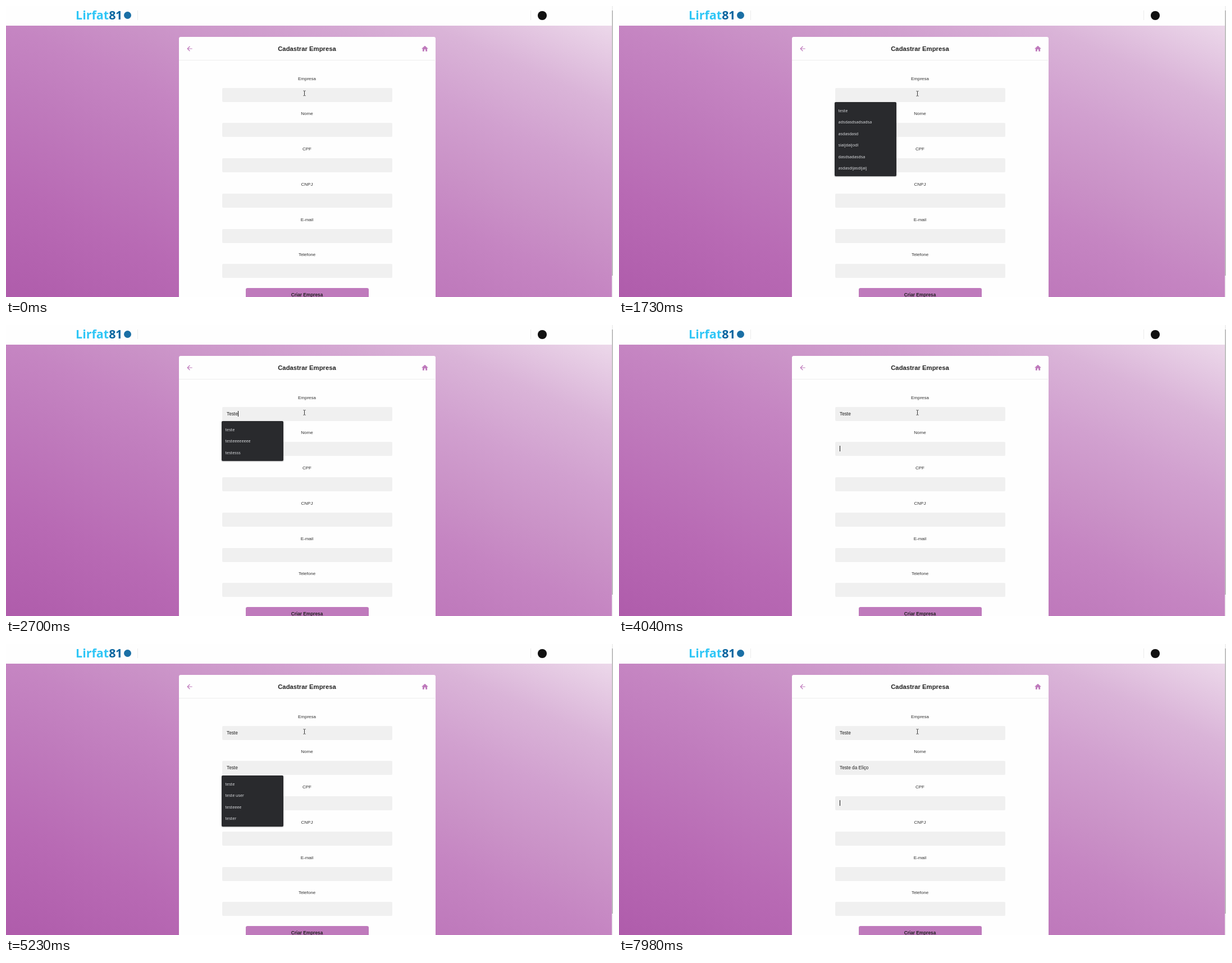
Write an HTML page that moves like this. It is 1081 by 518 pixels and loops after 8000 ms.

```html
<!DOCTYPE html>
<html lang="pt-BR">
<head>
<meta charset="utf-8">
<title>Cadastrar Empresa</title>
<style>
  html, body { margin: 0; width: 100%; height: 100%; overflow: hidden; }
  #stage {
    position: relative; width: 1081px; height: 518px; overflow: hidden;
    font-family: "Liberation Sans", Arial, sans-serif; color: #222;
  }
  #stage div, #stage svg { position: absolute; box-sizing: border-box; }
  .page {
    left: 0; top: 35px; width: 1079px; height: 483px;
    background: linear-gradient(to top right, #af5cab, #b86ab4 20%, #c07cbd 40%,
      #c585c2 50%, #ca92c7 60%, #d1a0cf 72%, #dab4d8 85%, #ecd8ea);
  }
  .top { left: 0; top: 0; width: 1079px; height: 35px; background: #fefefe; }
  .brand {
    left: 124px; top: 1px; line-height: 30px; color: #2fc6f6; white-space: nowrap;
    font-family: "Open Sans", "Noto Sans", sans-serif; font-size: 21.5px; font-weight: 700;
  }
  .brand b { color: #0b66a0; letter-spacing: -.5px; }
  .dot { border-radius: 50%; }
  .rule { top: 8px; width: 1px; height: 17px; background: #ececec; }
  .track { left: 1079px; top: 0; width: 2px; height: 518px; background: #f1f1f1; }
  .thumb { left: 0; top: 8px; width: 2px; height: 472px; background: #c1c1c1; }
  .card {
    left: 308px; top: 55px; width: 456.5px; height: 470px;
    background: #fefefe; border-radius: 3px;
  }
  .title {
    left: 0; top: 0; width: 456px; height: 42px; line-height: 42.5px;
    border-bottom: 1px solid #eee; text-align: center;
    font-size: 11.3px; font-weight: bold;
  }
  #form { left: 0; top: 0; }
  .label {
    left: 384px; width: 304px; height: 12px; line-height: 12px;
    text-align: center; font-size: 8px; color: #333;
  }
  .field {
    left: 384.5px; width: 303.5px; height: 25px; padding-left: 8.5px; line-height: 25.6px;
    background: #f0f0f0; border-radius: 2px; font-size: 8.27px; white-space: pre;
  }
  .caret {
    display: inline-block; width: 1px; height: 10px; margin-right: -1px;
    vertical-align: -2px; background: #111;
  }
  .button {
    left: 426.5px; top: 501.5px; width: 219px; height: 26px; line-height: 25.5px;
    background: #bf7abc; border-radius: 3px; text-align: center;
    font-size: 8.27px; font-weight: bold;
  }
  .list {
    left: 384px; width: 109.5px; padding: 4.7px 0 4.5px 6.5px; white-space: pre;
    background: #292a2d; color: #e4e6e9; border-radius: 2px;
    box-shadow: 0 1px 2px rgba(0, 0, 0, .3);
    font: 7.25px/20.5px "Open Sans", "Noto Sans", sans-serif;
  }
</style>
</head>
<body>
<div id="stage">
  <div class="page"></div>
  <div class="top">
    <div class="brand">Lirfat<b>81</b></div>
    <div class="dot" style="left:210px;top:10px;width:13px;height:13px;background:#1a6fa5"></div>
    <div class="rule" style="left:234px"></div>
    <div class="rule" style="left:934px"></div>
    <div class="dot" style="left:947px;top:9px;width:15.5px;height:15.5px;background:#111"></div>
  </div>
  <div class="track"><div class="thumb"></div></div>
  <div class="card"><div class="title">Cadastrar Empresa</div></div>
  <svg style="left:319.5px;top:68.8px" width="14" height="14" viewBox="0 0 24 24" fill="#bf7abc">
    <path d="M20 11H7.83l5.59-5.59L12 4l-8 8 8 8 1.41-1.41L7.83 13H20z"/>
  </svg>
  <svg style="left:738.8px;top:68.8px" width="14" height="14" viewBox="0 0 24 24" fill="#bf7abc">
    <path d="M10 20v-6h4v6h5v-8h3L12 3 2 12h3v8z"/>
  </svg>
  <div id="form"></div>
  <div class="button">Criar Empresa</div>
  <div class="list" id="list"></div>
  <svg id="pointer" style="left:528px;top:150px" width="7" height="11" viewBox="0 0 7 11"
       fill="none" stroke="#222" stroke-width=".9">
    <path d="M1.5 1h1.2l.8.6.8-.6h1.2M3.5 1.6v7.4M1.5 9.6h1.2l.8-.6.8.6h1.2"/>
  </svg>
</div>
<script>
const LOOP = 8000, FIRST_TOP = 145.5, PITCH = 62.76;
const labels = ["Empresa", "Nome", "CPF", "CNPJ", "E-mail", "Telefone"];
const form = document.getElementById("form");
const list = document.getElementById("list");
const pointer = document.getElementById("pointer");

function add(cls, top, text) {
  const el = document.createElement("div");
  el.className = cls;
  el.style.top = top + "px";
  el.textContent = text;
  form.append(el);
  return el;
}

const fields = labels.map((name, i) => {
  const top = FIRST_TOP + i * PITCH;
  add("label", top - 22, name);
  return add("field", top, "");
});

const caret = document.createElement("span");
caret.className = "caret";

const recent = ["teste", "adsdasdsadsadsa", "asdasdasd", "siaijdaijodl", "dasdsadasdsa", "asdasdijasdijaij"];
const companies = ["teste", "testeeeeeeee", "testesss"];
const people = ["teste", "teste user", "testeeee", "tester"];
const company = "Teste", person = "Teste da Eliço";

// Each step changes the form: n = letters typed in the focused field.
const steps = [
  [0, { focus: 0, n: 0, on: false, rows: [], y: 0 }],
  [120, { on: true, rows: recent }],
  [680, { on: false, y: 1 }],
  [1140, { on: true }],
  [1730, { on: false }],
  [2160, { on: true, n: 1 }],
  [2280, { rows: companies }],
  [2400, { n: 2 }],
  [2550, { n: 3 }],
  [2700, { n: 5 }],
  [2950, { focus: 1, n: 0, rows: [] }],
  [3480, { on: false }],
  [4040, { on: true }],
  [4160, { n: 1, rows: [...people, "tudo"] }],
  [4310, { n: 2, rows: people }],
  [4430, { n: 3 }],
  [4550, { n: 4 }],
  [4670, { n: 5 }],
  [5230, { on: false }],
  [5350, { on: true, n: 6, rows: ["teste user"] }],
  [5750, { on: false }],
  [5900, { on: true, n: 7, rows: [] }],
  [6050, { n: 8 }],
  [6200, { n: 9 }],
  [6350, { n: 10 }],
  [6470, { n: 11 }],
  [6620, { n: 12 }],
  [6770, { n: 14 }],
  [7020, { focus: 2, n: 0 }],
  [7450, { on: false }],
  [7980, { on: true }]
];

function show(count) {
  const s = Object.assign({}, ...steps.slice(0, count).map(step => step[1]));
  [company, person, ""].forEach((text, i) => {
    fields[i].textContent = i < s.focus ? text : i === s.focus ? text.slice(0, s.n) : "";
  });
  if (s.on) fields[s.focus].append(caret);
  list.style.display = s.rows.length ? "block" : "none";
  list.style.top = FIRST_TOP + 25.6 + s.focus * PITCH + "px";
  list.textContent = s.rows.join("\n");
  pointer.style.transform = `translateY(${s.y * 0.6}px)`;
}

let shown = 0;
const start = performance.now();
function frame(now) {
  const t = Math.max(0, now - start) % LOOP;
  const count = steps.filter(step => step[0] <= t).length;
  if (count !== shown) show(shown = count);
  requestAnimationFrame(frame);
}
frame(start);
</script>
</body>
</html>
```
